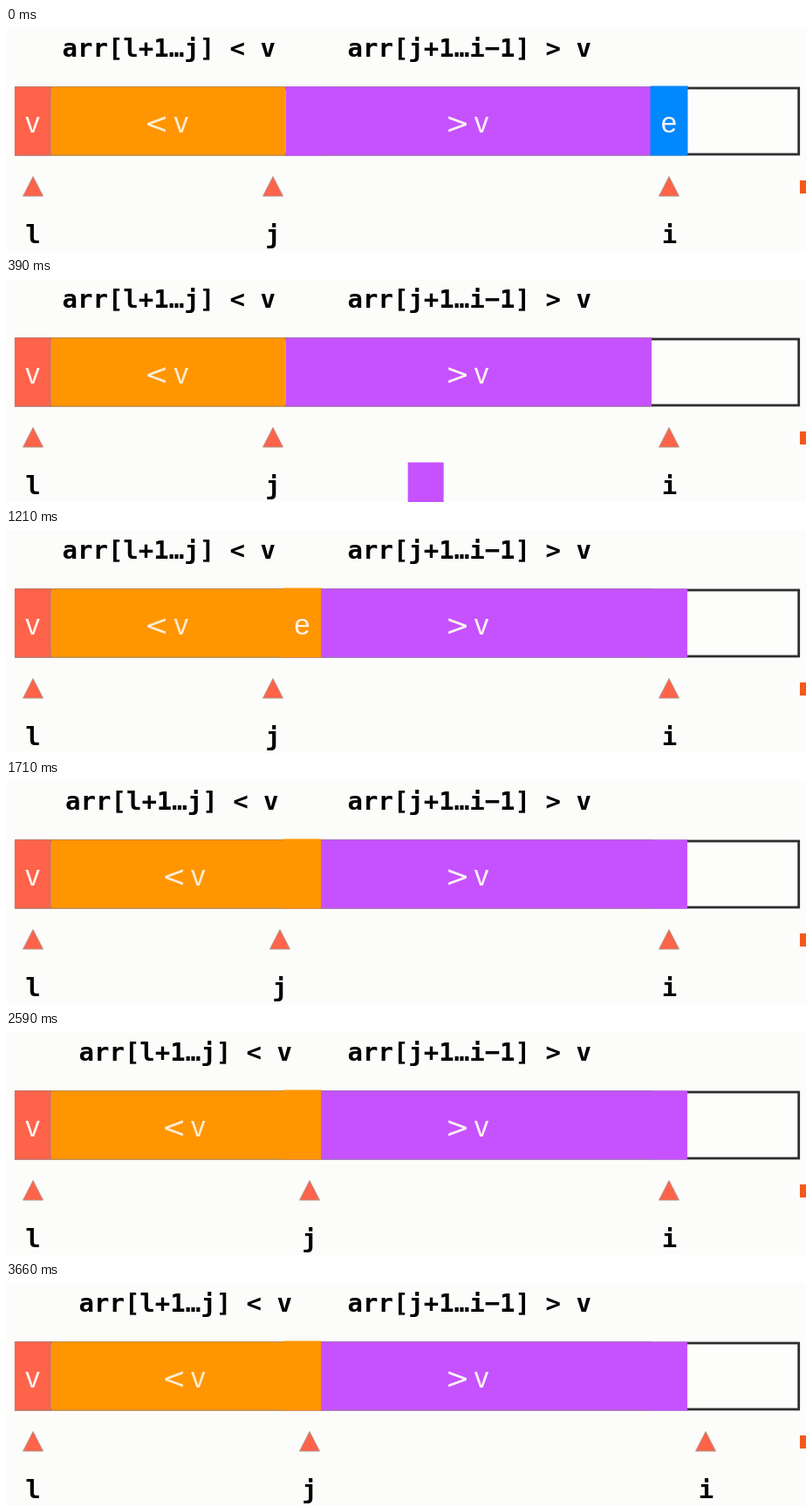
These frames come from a looping animation (917x256 px, 6780 ms). An HTML page:

```html
<!DOCTYPE html>
<html lang="en">
<head>
<meta charset="utf-8">
<title>Quicksort partition</title>
<style>
  :root { --red: #ff634a; --orange: #ff9500; --purple: #c652ff; --blue: #0088ff; }
  html, body { margin: 0; width: 100%; height: 100%; overflow: hidden; background: #fcfcfa; }
  #stage { position: absolute; left: 0; top: 0; width: 917px; height: 256px; overflow: hidden; }
  svg { position: absolute; left: 0; top: 0; }

  .code { font: bold 29px "DejaVu Sans Mono", monospace; fill: #000; white-space: pre; }
  .code.mid, .val text { text-anchor: middle; }
  .val { font: 33px "Liberation Sans", Arial, sans-serif; fill: #fff4f0; }
  .val .op { font-family: "DejaVu Sans", sans-serif; }
  .cream { fill: #fcecd4; }
  .edge { stroke: #8888; stroke-width: 1; }

  .tile {
    position: absolute; left: 0; top: 0;
    offset-anchor: 0 0; offset-rotate: 0deg;
  }
  #big {
    width: 41px; height: 79px; background: var(--purple);
    offset-path: path("M321 67.5C388 273 673 273 740 67.5");
  }
  #elem {
    width: 43px; height: 80px; background: var(--blue);
    offset-path: path("M738.5 66.5C671 -148 385 -148 318 66.5");
  }
  #elem svg { overflow: visible; }

  /* One shared 6.78 s cycle; every part moves inside its own window. */
  .tile, .anim { animation: 6780ms cubic-bezier(.37, 0, .63, 1) infinite; }
  #big { animation-name: carry; }
  #elem { animation-name: carry, tint; }
  .out { animation-name: out; }
  .in { animation-name: in; }
  .stepJ { animation-name: stepJ; }
  .stepI { animation-name: stepI; }

  @keyframes carry {
    0%, 1.06% { offset-distance: 0%; }
    12.3%, 100% { offset-distance: 100%; }
  }
  @keyframes tint {
    0%, 15.2% { background-color: var(--blue); }
    17.7%, 100% { background-color: var(--orange); }
  }
  @keyframes out {
    0%, 18.1% { opacity: 1; }
    21.4%, 100% { opacity: 0; }
  }
  @keyframes in {
    0%, 18.1% { opacity: 0; }
    21.4%, 100% { opacity: 1; }
  }
  @keyframes stepJ {
    0%, 22.05% { transform: translateX(0); }
    33.1%, 100% { transform: translateX(var(--dx)); }
  }
  @keyframes stepI {
    0%, 39.75% { transform: translateX(0); }
    50.8%, 100% { transform: translateX(var(--dx)); }
  }
</style>
</head>
<body>
<div id="stage">
  <svg width="917" height="256" viewBox="0 0 917 256">
    <defs>
      <path id="mark" d="M0 170.5L11.5 193H-11.5Z" fill="#ff634a" stroke="#b09a8c" stroke-width="1"/>
    </defs>

    <text class="code anim stepJ" style="--dx: 19px" x="64.5" y="33">arr[l+1…j] &lt; v</text>
    <text class="code" x="391.5" y="33">arr[j+1…i−1] &gt; v</text>

    <rect x="11.3" y="69" width="897.4" height="76" fill="#fdfdfc" stroke="#2e2e30" stroke-width="2.8"/>
    <rect x="10" y="67" width="41.5" height="79.5" fill="#ff634a"/>
    <rect x="51.5" y="67" width="269" height="79.5" fill="#ff9500"/>
    <rect x="320.5" y="67" width="419.5" height="79.5" fill="#c652ff"/>
    <path class="edge" d="M10 67.5H740M10 146H740M51.5 67V146" fill="none"/>

    <g class="val">
      <text x="30.5" y="119.5">v</text>
      <g class="cream anim out">
        <text class="op" x="172.5" y="121">&lt;</text>
        <text x="200.7" y="119.5">v</text>
      </g>
      <g class="cream anim in">
        <text class="op" x="192.5" y="121">&lt;</text>
        <text x="220.2" y="119.5">v</text>
      </g>
      <text class="op" x="517.5" y="121">&gt;</text>
      <text x="545" y="119.5">v</text>
    </g>

    <g>
      <use href="#mark" x="31"/>
      <text class="code mid" x="31" y="247">l</text>
    </g>
    <g class="anim stepJ" style="--dx: 42px">
      <use href="#mark" x="306"/>
      <text class="code mid" x="306" y="247">j</text>
    </g>
    <g class="anim stepI" style="--dx: 42px">
      <use href="#mark" x="760"/>
      <text class="code mid" x="760.5" y="247">i</text>
    </g>

    <rect x="910" y="175" width="15" height="15" fill="#f4581c"/>
  </svg>

  <div class="tile" id="big"></div>
  <div class="tile" id="elem">
    <svg width="43" height="80" class="val anim out"><text x="21.5" y="53">e</text></svg>
  </div>
</div>
</body>
</html>
```
